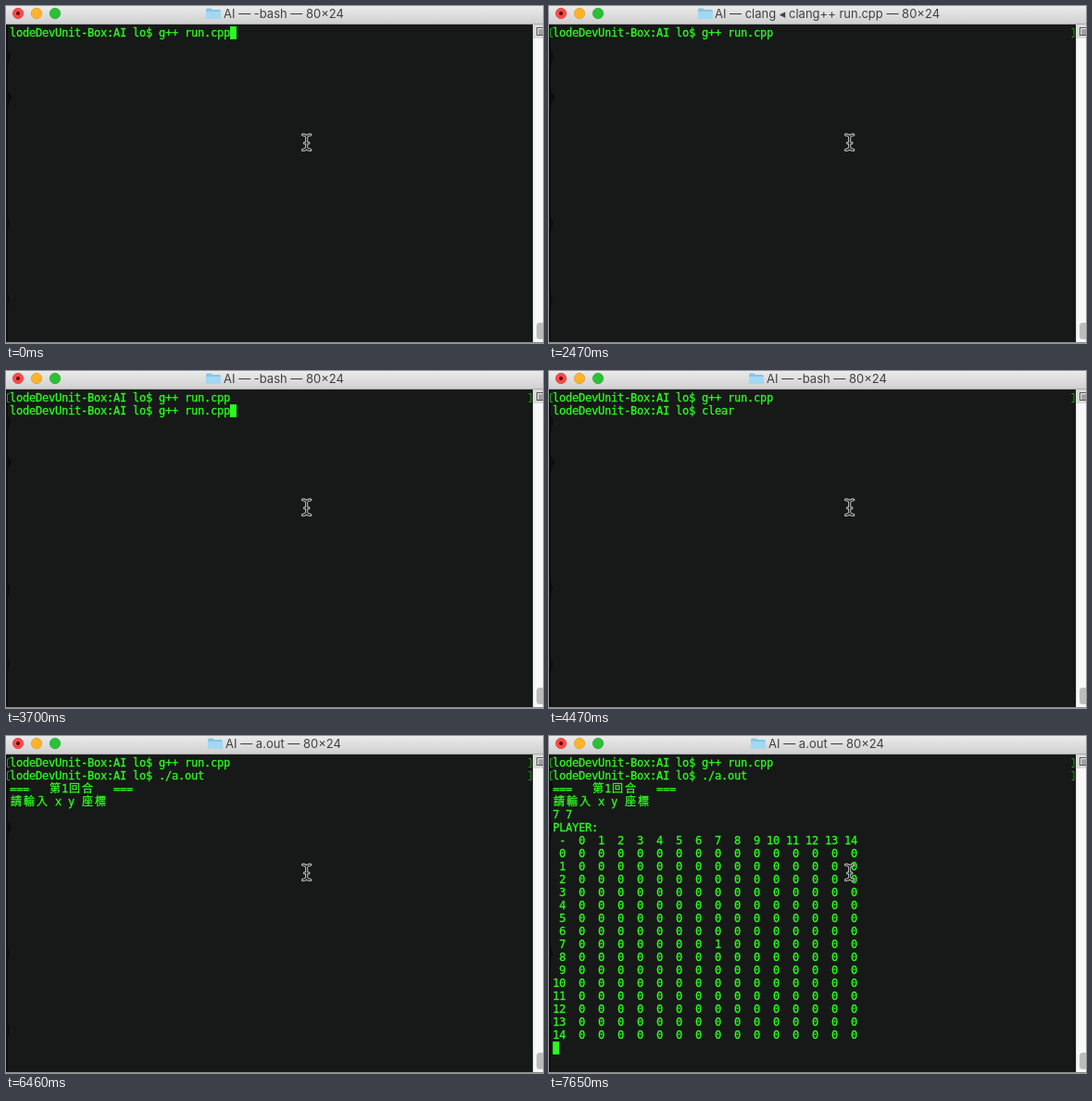
Write an HTML page that moves like this. It is 580 px wide and 364 px high and loops after 8000 ms.

```html
<!DOCTYPE html>
<html lang="en">
<head>
<meta charset="utf-8">
<title>Terminal session</title>
<style>
  html, body { margin: 0; width: 580px; height: 364px; overflow: hidden; background: #171918; }
  svg { display: block; }
  #title { font: 13px Inter, "DejaVu Sans", sans-serif; fill: #414141; text-anchor: middle; }
  #rows { font: 12px "DejaVu Sans Mono", "Noto Sans CJK TC", "Noto Sans CJK JP", "Noto Sans CJK", monospace;
          fill: #2bfb1e; stroke: #2bfb1e; stroke-width: .3; }
  #marks { fill: none; stroke: #1f9c19; }
  #beam { fill: none; stroke-linecap: round; stroke-linejoin: round; }
</style>
</head>
<body>
<svg width="580" height="364" viewBox="0 0 580 364">
  <defs>
    <linearGradient id="bar" x2="0" y2="1">
      <stop offset="0" stop-color="#ebebeb"/>
      <stop offset="1" stop-color="#d0d0d0"/>
    </linearGradient>
    <path id="ibeam" d="M320.5 139q3.500 0 4.200 2.500q.7-2.500 4.200-2.500M324.700 141.500v11.500M320.500 155.500q3.500 0 4.200-2.500q.7 2.500 4.200 2.500M322.500 148h4.500"/>
  </defs>

  <rect width="580" height="364" fill="#171918"/>
  <path d="M0 20H2V48Q5 52 5 55Q3 60 2 66V92Q6 96 6 100Q2 105 2 112V228Q4 232 4 236Q2 240 2 246V311Q4 314 4 317Q2 321 2 326V362H0Z" fill="#0c0e0d"/>

  <rect width="580" height="19" fill="url(#bar)"/>
  <rect y="19" width="580" height="1" fill="#a9a9a9"/>
  <g stroke-width=".7">
    <circle cx="13" cy="8" r="5.700" fill="#fc4a48" stroke="#dd3a38"/>
    <circle cx="13" cy="8" r="2" fill="#4d0504"/>
    <circle cx="33" cy="8" r="5.700" fill="#fdb42b" stroke="#dd9a22"/>
    <circle cx="53" cy="8" r="5.700" fill="#2ac136" stroke="#1fa52b"/>
  </g>
  <g id="folder">
    <path d="M0 4q0-1.500 1.500-1.500h4l1.500 1.500h7.500q1.500 0 1.500 1.500v7q0 1.500-1.500 1.500h-13q-1.500 0-1.500-1.500z" fill="#86c5e6"/>
    <path d="M0 6h16v6.500q0 1.500-1.500 1.500h-13q-1.500 0-1.500-1.500z" fill="#a3d8f2"/>
  </g>
  <text id="title" y="13"></text>

  <rect x="569" y="20" width="11" height="344" fill="#f8f8f8"/>
  <rect x="569" y="20" width="1" height="344" fill="#dcdcdc"/>
  <rect x="569" y="20" width="11" height="15" fill="#d9d9d9"/>
  <rect x="573.500" y="23.500" width="9" height="8" fill="#eee" stroke="#555"/>
  <path d="M575 26h5M575 28h5M575 30h5" stroke="#555"/>
  <rect x="573" y="342" width="9" height="18" rx="3.500" fill="#bcbcbc"/>
  <rect y="363" width="580" height="1" fill="#8b8d8c"/>

  <g id="marks"></g>
  <rect id="caret" width="7" height="14" fill="#2bfb1e"/>
  <g id="rows"></g>
  <g id="beam">
    <use href="#ibeam" stroke="#d5d5d5" stroke-width="3"/>
    <use href="#ibeam" stroke="#171918" stroke-width="1.200"/>
  </g>
</svg>
<script>
const LOOP = 8000, CELL = 7, LINE = 14, LEFT = 4, TOP = 22;
const $ = id => document.getElementById(id);

const prompt = "lodeDevUnit-Box:AI lo$ ";
const build = prompt + "g++ run.cpp";
const run = prompt + "./a.out";

const shell = { text: "AI — -bash — 80×24", mid: 300, icon: 216 };
const compiler = { text: "AI — clang ◂ clang++ run.cpp — 80×24", mid: 300.5, icon: 161 };
const game = { text: "AI — a.out — 80×24", mid: 299.5, icon: 218 };

const intro = [build, run, "===   第1回合   ===", "請輸入 x y 座標"];
const line = cells => cells.map(c => String(c).padStart(2)).join(" ");
const ids = [...Array(15).keys()];
const board = [
  line(["-", ...ids]),
  ...ids.map(y => line([y, ...ids.map(x => x === 7 && y === 7 ? 1 : 0)]))
];

// Each step overrides part of the state; the caret sits at the end of the last row.
const steps = [
  [0, { title: shell, rows: [build], done: 0, caret: true }],
  [500, { rows: [build, ""], done: 1 }],
  [600, { title: compiler }],
  [1510, { caret: false }],
  [1990, { caret: true }],
  [2470, { caret: false }],
  [2980, { rows: [build, prompt], caret: true }],
  [3100, { title: shell }],
  [3700, { rows: [build, build] }],
  [3870, { rows: [build, prompt + "clear"] }],
  [4470, { caret: false }],
  [4820, { rows: [build, run], caret: true }],
  [5450, { caret: false }],
  [5560, { rows: [build, run, ""], done: 2, caret: true }],
  [5620, { rows: [...intro, ""] }],
  [5680, { title: game }],
  [6460, { caret: false }],
  [6700, { rows: [...intro, "7"], caret: true }],
  [7060, { rows: [...intro, "7 "] }],
  [7240, { rows: [...intro, "7 7"] }],
  [7650, { rows: [...intro, "7 7", "PLAYER:", ...board, ""] }]
];

function rowText(str, r) {
  let x = LEFT;
  const xs = [...str].map(ch => {
    const wide = ch > "\u2e80";
    const at = wide ? x + 1 : x;
    x += wide ? CELL * 2 : CELL;
    return at;
  });
  const y = TOP + LINE * r + 11;
  return `<text x="${xs.join(" ")}" y="${y}">${str.replace(/ /g, "\u00a0")}</text>`;
}

function bracket(r) {
  const y = TOP + LINE * r + 2.5;
  return `<path d="M4 ${y}h-2.500v9h2.500M564.500 ${y}h2.500v9h-2.500"/>`;
}

function draw(s) {
  $("title").textContent = s.title.text;
  $("title").setAttribute("x", s.title.mid);
  $("folder").setAttribute("transform", `translate(${s.title.icon} 0)`);
  $("rows").innerHTML = s.rows.map(rowText).join("");
  $("marks").innerHTML = [...Array(s.done).keys()].map(bracket).join("");
  const last = s.rows.length - 1;
  $("caret").setAttribute("x", LEFT + CELL * s.rows[last].length);
  $("caret").setAttribute("y", TOP + LINE * last);
  $("caret").setAttribute("visibility", s.caret ? "visible" : "hidden");
}

let shown = 0;
function tick() {
  const t = performance.now() % LOOP;
  const past = steps.filter(([at]) => at <= t);
  if (past.length !== shown) {
    shown = past.length;
    draw(Object.assign({}, ...past.map(([, part]) => part)));
  }
  requestAnimationFrame(tick);
}
tick();
</script>
</body>
</html>
```
